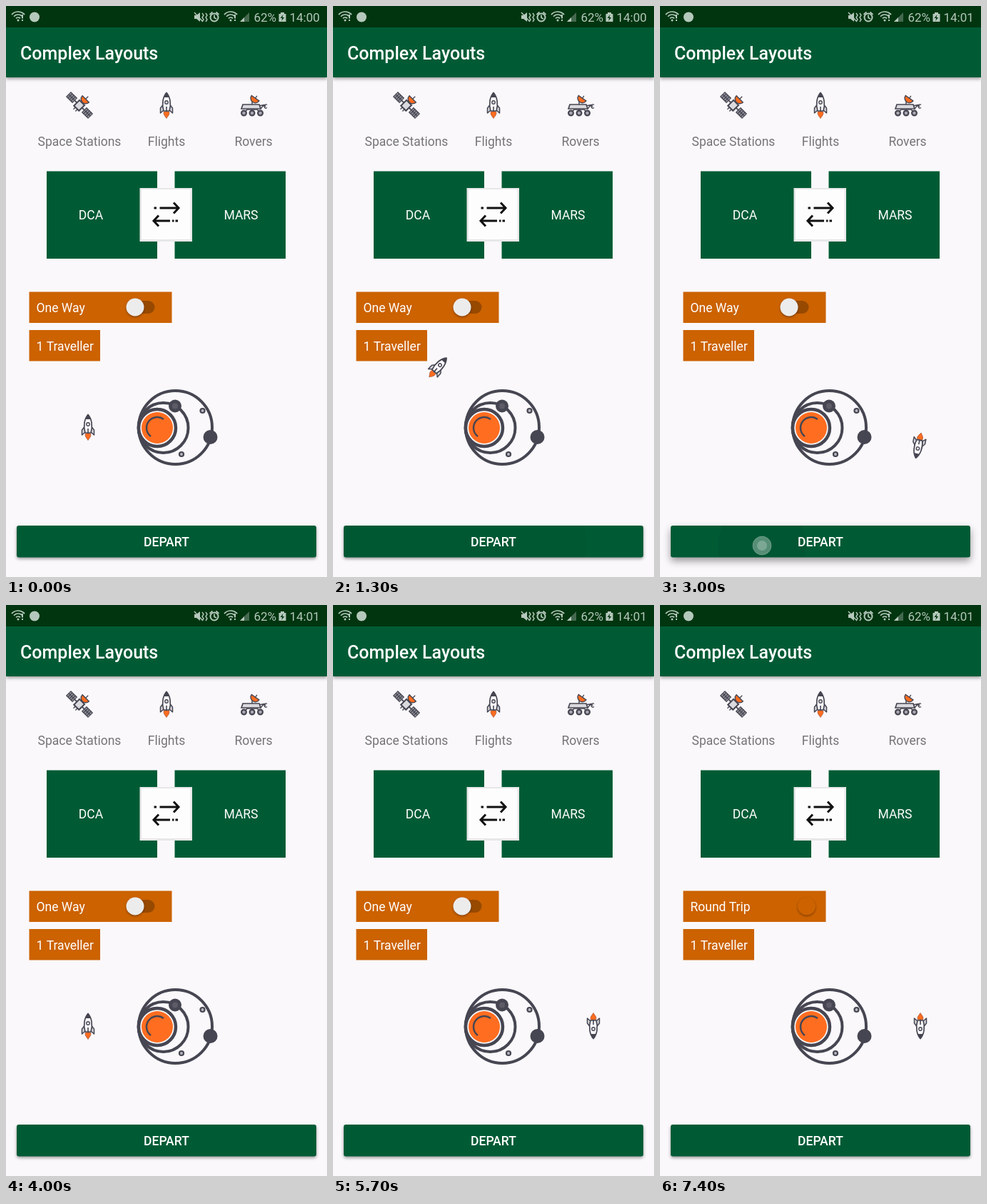
An HTML page with a canvas that plays this animation: 450 by 800 pixels, repeating every 8 s.

```html
<!DOCTYPE html>
<html lang="en">
<head>
<meta charset="utf-8">
<title>Complex Layouts</title>
<style>
html, body { margin: 0; width: 100%; height: 100%; overflow: hidden; background: #faf8fb; }
canvas { display: block; width: 450px; height: 800px; }
</style>
</head>
<body>
<canvas id="stage" width="450" height="800"></canvas>
<script>
const ctx = document.getElementById('stage').getContext('2d');
const LOOP = 8000, STEP = 100, FLIGHT = 1000;
const GREEN = '#005b35', AMBER = '#cc6200', INK = '#464652', FIRE = '#ff6d20', PAPER = '#faf8fb';
const STATUS = '#b5c8bc';

// Each press of DEPART sends the rocket half an orbit onward.
const presses = [
  { x: 143, y: 756, down: 500, up: 1000, launch: 1066, from: 0 },
  { x: 143, y: 756, down: 2800, up: 3050, launch: 2933, from: 180 },
  { x: 222, y: 750, down: 4600, up: 4700, launch: 4680, from: 0 }
];
const toggle = { x: 206, y: 423, down: 6900, up: 7050, start: 7050, end: 7300 };
const CLOCK_TICK = 1700;

const clamp = v => Math.max(0, Math.min(1, v));
const progress = (t, start, length) => clamp((t - start) / length);
const smooth = p => 0.5 - 0.5 * Math.cos(Math.PI * p);

function rect(x, y, w, h, color) {
  ctx.fillStyle = color;
  ctx.fillRect(x, y, w, h);
}

function roundRect(x, y, w, h, r, color) {
  ctx.beginPath();
  ctx.roundRect(x, y, w, h, r);
  ctx.fillStyle = color;
  ctx.fill();
}

function circle(x, y, r, fill, stroke, width) {
  ctx.beginPath();
  ctx.arc(x, y, r, 0, Math.PI * 2);
  if (fill) { ctx.fillStyle = fill; ctx.fill(); }
  if (stroke) { ctx.strokeStyle = stroke; ctx.lineWidth = width; ctx.stroke(); }
}

function path(d, fill, stroke, width = 1.5) {
  const shape = new Path2D(d);
  if (fill) { ctx.fillStyle = fill; ctx.fill(shape); }
  if (stroke) { ctx.strokeStyle = stroke; ctx.lineWidth = width; ctx.stroke(shape); }
}

function text(str, x, y, color, size = 17.5, weight = 400, align = 'left') {
  ctx.font = `${weight} ${size}px Roboto, sans-serif`;
  ctx.textAlign = align;
  ctx.fillStyle = color;
  ctx.fillText(str, x, y);
}

function shadowed(blur, dy, alpha, draw) {
  ctx.save();
  ctx.shadowColor = `rgba(0,0,0,${alpha})`;
  ctx.shadowBlur = blur;
  ctx.shadowOffsetY = dy;
  draw();
  ctx.restore();
}

function at(x, y, degrees, draw) {
  ctx.save();
  ctx.translate(x, y);
  ctx.rotate(degrees * Math.PI / 180);
  draw();
  ctx.restore();
}

function wifi(x, y) {
  for (const r of [4, 8, 12]) {
    ctx.beginPath();
    ctx.arc(x, y, r, -Math.PI * 0.77, -Math.PI * 0.23);
    ctx.strokeStyle = STATUS;
    ctx.lineWidth = 1.7;
    ctx.stroke();
  }
  circle(x, y, 1.5, STATUS);
  rect(x + 5, y - 8, 2, 5.5, STATUS);
  rect(x + 5, y - 1, 2, 2, STATUS);
}

function statusBar(t) {
  rect(0, 0, 450, 30, '#00350f');
  wifi(17, 20);
  circle(40, 15.5, 7, STATUS);
  path('M264 13h3l5-4v13l-5-4h-3z', STATUS);
  path('M264 9l12 13M275 10l2 3l-2 3l2 3l-2 3M280 10l2 3l-2 3l2 3l-2 3', null, STATUS, 1.4);
  circle(292, 16, 5.5, null, STATUS, 2);
  path('M292 12.5v4l3 1.5M285.5 12l4-3.5M298.500 12l-4-3.500', null, STATUS, 1.7);
  wifi(315, 20);
  path('M328 22L341 9V22z', '#45694f');
  path('M328 22L334 16V22z', STATUS);
  text('62%', 347.500, 22, STATUS, 17);
  path('M385 9h5v2h2.500v11h-10v-11h2.500z', STATUS);
  path('M388.500 12l-4 5h2.700l-1 4l4-5h-2.700z', '#00350f');
  text(t < CLOCK_TICK ? '14:00' : '14:01', 397.500, 22, STATUS, 17);
}

function rocket(x, y, degrees) {
  at(x, y, degrees, () => {
    ctx.lineJoin = 'round';
    path('M-3.500 9C-5 13 -2 15 0 18.500C2 15 5 13 3.500 9z', FIRE, '#9c4b2c', 0.7);
    path('M-4.500 -1L-8.500 4V11L-4 7zM4.500 -1L8.500 4V11L4 7z', '#d8d7dd', INK, 1.5);
    path('M0 -17.500C-5 -12 -7 -2 -4 8H4C7 -2 5 -12 0 -17.500z', PAPER, INK, 1.7);
    path('M0 -18C-2 -16 -3 -13.500 -3.700 -11H3.700C3 -13.500 2 -16 0 -18z', INK);
    circle(0, -4, 2.200, PAPER, INK, 1.4);
    path('M0 2V9', null, INK, 1.600);
  });
}

function solarPanel(x) {
  rect(x, -5, 13, 10, INK);
  for (let col = 0; col < 4; col++) {
    for (const y of [-3.7, 0.6]) rect(x + 1.2 + col * 3, y, 1.7, 3.1, '#96959e');
  }
}

function satellite() {
  at(103, 139, 45, () => {
    solarPanel(-22);
    solarPanel(9);
    path('M-9 0H9', null, INK, 2);
    path('M-5 -5H5V6H-5z', '#dad9de', INK, 2);
    path('M-2 6V10M2 6V10', null, INK, 1.4);
    path('M0 -5V-9', null, INK, 1.500);
  });
  at(111, 131, 45, () => {
    path('M-6.500 -1A6.500 6.500 0 0 0 6.500 -1z', FIRE, INK, 1.400);
    path('M0 -1V-6', null, INK, 1.300);
  });
}

function rover() {
  path('M345 139V134M354 140L362 138.500L364 141M357 144L361 139', null, INK, 1.500);
  path('M366 138.500A2.500 2.500 0 1 0 366 142.500', null, INK, 1.400);
  at(349, 130, 35, () => {
    path('M-6.500 -1A6.500 6.500 0 0 0 6.500 -1z', FIRE, INK, 1.400);
    path('M0 -1V-5', null, INK, 1.300);
  });
  path('M332 138H355L357 144H330z', '#dad9de', INK, 1.700);
  path('M334 150L338 145H352L357 150M345 145V150', null, INK, 1.500);
  for (const x of [333.5, 345, 356.5]) circle(x, 150, 3.400, '#aaa9b1', INK, 2.200);
}

function planet() {
  circle(237.500, 590.5, 51.500, null, INK, 4);
  circle(220.500, 591, 35, null, INK, 4);
  circle(212, 591, 26, PAPER, INK, 4.500);
  circle(212, 591, 22, FIRE);
  path('M221 579A15 15 0 0 0 203 603', null, INK, 2.500);
  circle(237, 560.5, 9, INK);
  circle(237, 560.5, 4, '#5c5b66');
  circle(286.500, 604, 10, INK);
  circle(275.500, 567, 3, '#b9b8bf', INK, 2.200);
  circle(246, 628, 3, '#b9b8bf', INK, 2.200);
}

function header() {
  shadowed(5, 2, 0.4, () => rect(0, 30, 450, 70, GREEN));
  text('Complex Layouts', 20, 75, '#fff', 25, 500);
  satellite();
  rocket(225, 139, 0);
  rover();
  const grey = '#757477';
  text('Space Stations', 103, 196, grey, 17.5, 400, 'center');
  text('Flights', 225, 196, grey, 17.5, 400, 'center');
  text('Rovers', 347, 196, grey, 17.5, 400, 'center');
}

function route() {
  rect(57, 231.500, 155, 122.500, GREEN);
  rect(236.500, 231.500, 155.500, 122.500, GREEN);
  text('DCA', 119, 299, '#fff', 17.5, 400, 'center');
  text('MARS', 329.500, 299, '#fff', 17.5, 400, 'center');
  rect(187.500, 255, 73.500, 75, '#e7e7e9');
  rect(190, 257, 68.500, 70, '#fdfdfd');
  ctx.lineJoin = 'miter';
  path('M207.500 283H211M215.500 283H241M235 275.500L242 283L235 290.500', null, '#111', 3);
  path('M207 301H230M233 301H235.500M237.500 301H241M214 293.500L207 301L214 308.500', null, '#111', 3);
}

function touchDot({ x, y, down, up }, t) {
  if (t < down || t >= up) return;
  circle(x, y, 13, 'rgba(205,220,212,.42)', 'rgba(190,210,200,.35)', 1);
  circle(x, y, 7, 'rgba(235,242,238,.25)');
}

function options(t) {
  const on = smooth(progress(t, toggle.start, toggle.end - toggle.start));
  const checked = t >= toggle.start;
  const thumbX = 181 + 24.500 * on;
  rect(32.500, 400.500, 200, 43.500, AMBER);
  text(checked ? 'Round Trip' : 'One Way', 42.500, 429, '#fff');
  roundRect(172, 413, 36.500, 18, 9, `rgba(0,0,0,${0.26 * (1 - on)})`);

  const halo = progress(t, toggle.down, 150) * (1 - progress(t, toggle.up, 350));
  if (halo > 0) {
    circle(thumbX, 423, 20, checked ? `rgba(255,150,50,${0.2 * halo})` : `rgba(0,0,0,${0.12 * halo})`);
  }
  const mix = (a, b) => Math.round(a + (b - a) * on);
  const thumb = `rgb(${mix(236, 204)},${mix(236, 98)},${mix(236, 0)})`;
  shadowed(3, 1.500, 0.35, () => circle(thumbX, 422, 12.500, thumb));
  touchDot(toggle, t);

  rect(32.500, 454, 99.500, 43.500, AMBER);
  text('1 Traveller', 42.500, 483, '#fff');
}

function orbitAngle(t) {
  let angle = 0;
  for (const p of presses) {
    if (t >= p.launch) angle = p.from + 180 * progress(t, p.launch, FLIGHT);
  }
  return angle;
}

function orbitingRocket(t) {
  const degrees = orbitAngle(t), a = degrees * Math.PI / 180;
  rocket(240 - 125 * Math.cos(a), 590 - 125 * Math.sin(a), degrees);
}

function departButton(t) {
  const lift = Math.max(...presses.map(p =>
    progress(t, p.down, 150) * (1 - progress(t, p.up, 200))));
  shadowed(4 + 7 * lift, 2 + 3 * lift, 0.4, () => roundRect(15, 728, 420, 44.500, 3, GREEN));

  ctx.save();
  ctx.beginPath();
  ctx.roundRect(15, 728, 420, 44.500, 3);
  ctx.clip();
  for (const p of presses) {
    const fade = 1 - progress(t, p.up, 600);
    if (t > p.down && fade > 0) {
      circle(p.x, p.y, 12 + (t - p.down) * 0.25, `rgba(0,0,0,${0.06 * fade})`);
    }
  }
  ctx.restore();
  text('DEPART', 225, 757, '#fff', 17.5, 500, 'center');
  for (const p of presses) touchDot(p, t);
}

function draw(now) {
  const t = Math.floor((now % LOOP) / STEP) * STEP;
  rect(0, 0, 450, 800, PAPER);
  header();
  statusBar(t);
  route();
  options(t);
  planet();
  orbitingRocket(t);
  departButton(t);
  requestAnimationFrame(draw);
}
requestAnimationFrame(draw);
</script>
</body>
</html>
```
